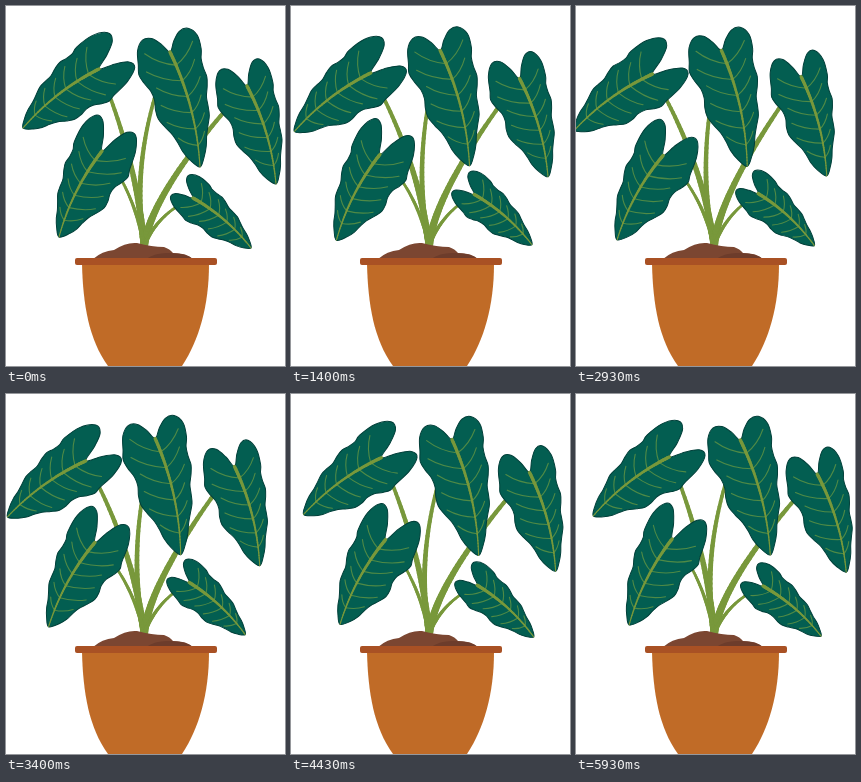
These frames come from a looping animation (279x360 px, 6.01 s). An HTML page with a canvas:

```html
<!DOCTYPE html>
<html lang="en">
<head>
<meta charset="utf-8">
<title>Swaying plant</title>
<style>
  html, body { margin: 0; width: 100%; height: 100%; overflow: hidden; background: #fff; }
  canvas { display: block; }
</style>
</head>
<body>
<canvas id="stage" width="279" height="360"></canvas>
<script>
const ctx = document.getElementById('stage').getContext('2d');
const LOOP = 6010, STEPS = 120, ROOT = [138, 240];
const GREEN = '#78983b', VEIN = '#4f8a46', LEAF = '#035e51', EDGE = '#013f39';

// lobe: how far the two lobes reach behind the notch; wide: half widths of the
// rippled and the smooth side; flip: mirrors the sides; bend: stem control point.
const leaves = [
  { notch: [93, 63], tip: [17, 122], lobe: 30, wide: [29, 30], flip: -1, bend: [131, 154], thick: 7 },
  { notch: [164, 46], tip: [194, 161], lobe: 19, wide: [33, 30], flip: 1, bend: [123, 151], thick: 6 },
  { notch: [241, 80], tip: [270, 178], lobe: 23, wide: [31, 25], flip: 1, bend: [146, 184], thick: 8 },
  { notch: [96, 145], tip: [53, 231], lobe: 30, wide: [32, 28], flip: -1, bend: [128, 184], thick: 4 },
  { notch: [187, 192], tip: [245, 242], lobe: 18, wide: [20, 20], flip: 1, bend: [152, 207], thick: 4 }
];

// Cosine sway with a peak time in seconds, zero at the start of the loop.
const wave = (t, peak) => Math.cos((t - peak) * Math.PI / 3);
const change = (t, peak) => wave(t, peak) - wave(0, peak);
const mix = (a, b, u) => a + (b - a) * u;

function spin([x, y], angle) {
  const dx = x - ROOT[0], dy = y - ROOT[1], c = Math.cos(angle), s = Math.sin(angle);
  return [ROOT[0] + dx * c - dy * s, ROOT[1] + dx * s + dy * c];
}

function smooth(p) {
  const n = p.length, path = new Path2D();
  path.moveTo(...p[0]);
  for (let i = 0; i < n; i++) {
    const [a, b, c, d] = [n - 1, 0, 1, 2].map(k => p[(i + k) % n]);
    path.bezierCurveTo(b[0] + (c[0] - a[0]) / 6, b[1] + (c[1] - a[1]) / 6,
      c[0] - (d[0] - b[0]) / 6, c[1] - (d[1] - b[1]) / 6, ...c);
  }
  return path;
}

// Half width at u, from notch (0) to tip (1); side 1 is rippled, -1 is smooth.
function halfWidth(leaf, u, side) {
  const ripple = side > 0 ? .1 * Math.cos((u - .12) * 15.7) : .05 * Math.cos((u - .3) * 21);
  return leaf.wide[side > 0 ? 0 : 1] * (1 - u * u) ** .8 * (1 + ripple);
}

function halfEdge(leaf, side) {
  const w = halfWidth(leaf, 0, side) * side;
  const lobe = [[.5, .2], [.93, .45], [.97, .74], [.5, .97]];
  const edge = lobe.map(([back, out]) => [-back * leaf.lobe, out * w]);
  for (let u = .04; u < .99; u += .08) edge.push([u * leaf.length, side * halfWidth(leaf, u, side)]);
  return edge;
}

function prepare(leaf) {
  const dx = leaf.tip[0] - leaf.notch[0], dy = leaf.tip[1] - leaf.notch[1];
  leaf.length = Math.hypot(dx, dy);
  leaf.angle = Math.atan2(dy, dx);
  leaf.path = smooth([[0, 0], ...halfEdge(leaf, 1), [leaf.length, 0], ...halfEdge(leaf, -1).reverse()]);
}

function taper(at, from, to) {
  ctx.strokeStyle = GREEN;
  for (let i = 0; i < 40; i++) {
    ctx.lineWidth = mix(from, to, i / 40);
    ctx.beginPath();
    ctx.moveTo(...at(i / 40));
    ctx.lineTo(...at((i + 1) / 40));
    ctx.stroke();
  }
}

function drawStem(leaf, sway) {
  const bend = spin(leaf.bend, sway / 2), end = spin(leaf.notch, sway);
  const at = u => [0, 1].map(k => mix(mix(ROOT[k], bend[k], u), mix(bend[k], end[k], u), u));
  taper(at, leaf.thick, leaf.thick / 3 + .6);
}

function drawLeaf(leaf, sway, turn) {
  const size = leaf.length;
  ctx.save();
  ctx.translate(...spin(leaf.notch, sway));
  ctx.rotate(leaf.angle + turn);
  ctx.scale(1, leaf.flip);
  ctx.fillStyle = LEAF;
  ctx.fill(leaf.path);
  ctx.strokeStyle = EDGE;
  ctx.lineWidth = 1;
  ctx.stroke(leaf.path);

  const rib = u => [u * size, -.2 * u * (1 - u) * size];
  ctx.strokeStyle = VEIN;
  ctx.lineWidth = 1.1;
  for (const side of [-1, 1]) {
    for (let u = .12; u < .9; u += .14) {
      const [x, y] = rib(u), back = .17 * size * (1 - u / 2);
      const out = side * halfWidth(leaf, Math.max(0, u - .12), side) * .78;
      ctx.beginPath();
      ctx.moveTo(x, y);
      ctx.quadraticCurveTo(x - back * .3, mix(y, out, .6), x - back, out);
      ctx.stroke();
    }
  }
  taper(rib, 3.4, 1);
  ctx.restore();
}

function fill(color, d) {
  ctx.fillStyle = color;
  ctx.fill(new Path2D(d));
}

function drawPot() {
  fill('#7b4631', 'M87 253Q96 245 108 244Q120 236 131 237Q146 241 158 241Q164 243 167 247Q181 247 187 253Z');
  fill('#6d3c2b', 'M140 253Q150 246 164 247Q180 247 187 253Z');
  fill('#c06b27', 'M76 258C77 299 83 334 102 360H176C193 334 203 300 203 258Z');
  ctx.fillStyle = '#a95124';
  ctx.beginPath();
  ctx.roundRect(69, 252, 142, 7, 2);
  ctx.fill();
}

function draw(t) {
  const sway = .058 * change(t, 5.4), turn = .021 * change(t, 3.5);
  ctx.clearRect(0, 0, 279, 360);
  leaves.forEach(leaf => drawStem(leaf, sway));
  drawPot();
  leaves.forEach(leaf => drawLeaf(leaf, sway, turn));
}

// Poses alternate between 30 and 70 ms on screen.
function tick() {
  const ms = performance.now() % LOOP;
  const step = Math.min(STEPS - 1, Math.floor(ms / 100) * 2 + (ms % 100 >= 30 ? 1 : 0));
  draw(step * .05);
  requestAnimationFrame(tick);
}

ctx.lineCap = ctx.lineJoin = 'round';
leaves.forEach(prepare);
tick();
</script>
</body>
</html>
```
